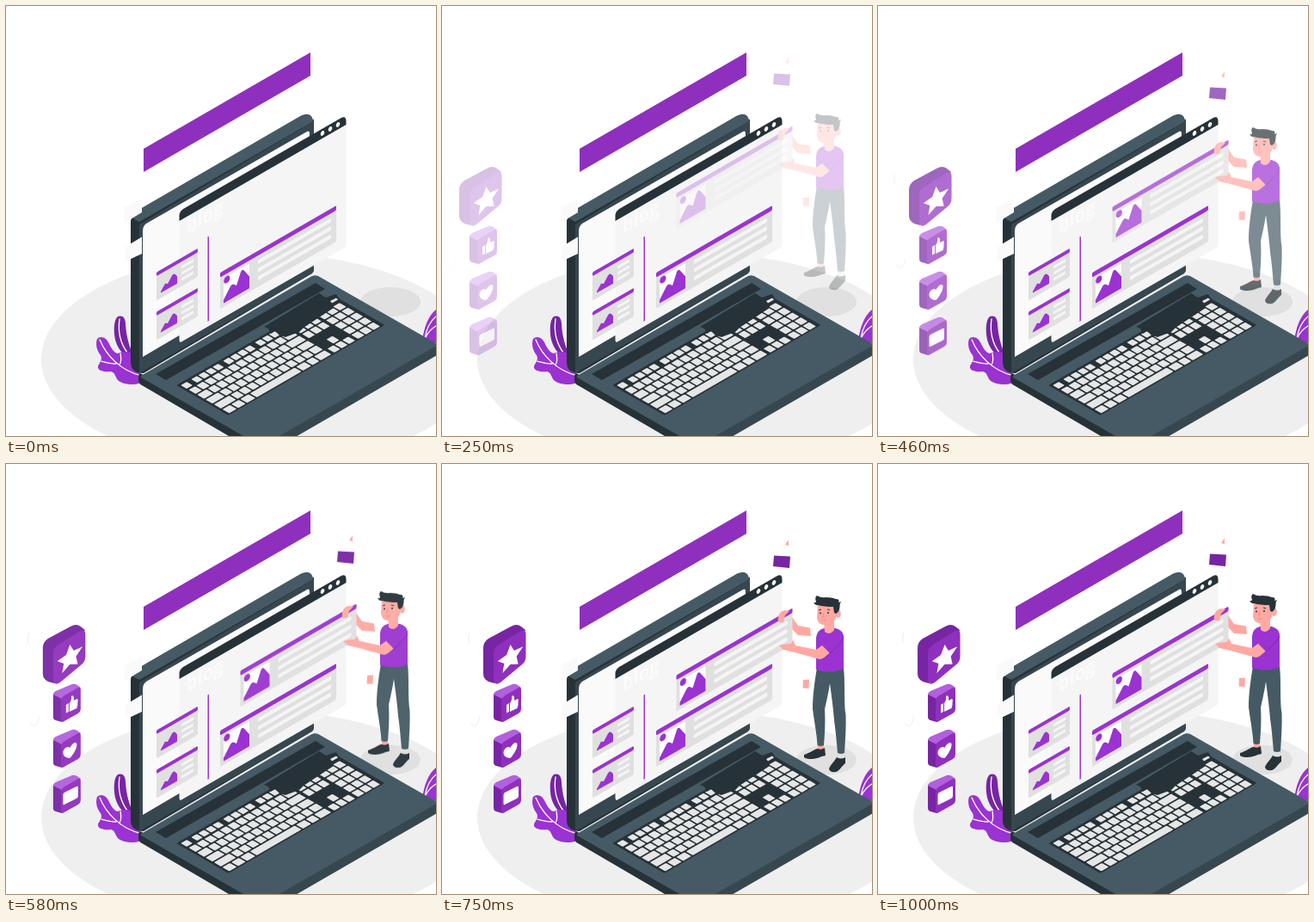
An HTML page that plays this animation: 500 by 500 pixels, repeating every 1.04 s.

```html
<!DOCTYPE html>
<html lang="en">
<head>
<meta charset="utf-8">
<title>Blog post</title>
<style>
  html, body { margin: 0; width: 100%; height: 100%; overflow: hidden; background: #fff; }
  svg { display: block; width: 100%; height: 100%; }
  .purple { fill: #9a33d1; }
  .deep { fill: #8f2fbe; }
  .plum { fill: #7725a2; }
  .ink { fill: #263238; }
  .steel { fill: #37474f; }
  .slate { fill: #455a64; }
  .grey { fill: #e0e0e0; }
  .pale { fill: #f5f5f5; }
  .white { fill: #fff; }
  .skin { fill: #ffa8a2; }
  .vein { fill: none; stroke: #fff; stroke-width: 1.3; stroke-linecap: round; }
  .faint { fill: none; stroke: #ececec; }
  text { font: 700 23px "Open Sans", sans-serif; fill: #fbfbfb; }
</style>
</head>
<body>
<svg viewBox="0 0 500 500">
  <defs>
    <g id="post">
      <rect class="grey" width="135" height="42" rx="1.5"/>
      <rect class="purple" width="135" height="5.5" rx="1.5"/>
      <rect class="white" x="4" y="9" width="30" height="29"/>
      <path class="purple" d="M4 38V34L12 23Q14 21 16 23L19 26 24 13Q26 10 28 14L34 24V38Z"/>
      <ellipse class="purple" cx="7.8" cy="12.500" rx="3.6" ry="4"/>
      <g class="pale">
        <rect x="44" y="11" width="85" height="4.6" rx="1"/>
        <rect x="44" y="20.500" width="85" height="4.6" rx="1"/>
        <rect x="44" y="30" width="85" height="4.6" rx="1"/>
      </g>
    </g>
    <g id="teaser">
      <rect class="grey" width="48" height="33" rx="1.5"/>
      <rect class="purple" width="48" height="4.6" rx="1.5"/>
      <path class="purple" d="M5 27V25.500L10 19 13 21 18 14.500Q20 12.500 22 15.500L24 18.500V27Z"/>
      <g class="pale">
        <rect x="29" y="9.500" width="14" height="3.4" rx="1"/>
        <rect x="29" y="16.500" width="14" height="3.4" rx="1"/>
        <rect x="29" y="23.500" width="14" height="3.4" rx="1"/>
      </g>
    </g>
    <g id="tile">
      <path class="plum" d="M60 269Q60 266 63 267L70 271V300L63 298Q60 297 60 294Z"/>
      <path d="M60 268Q60 266 63 264L82 256Q85 255 88 257L92 260 70 273Z" fill="#b260de"/>
      <path class="deep" d="M69 275Q69 272 72 270L89 260Q92 259 92 262V285Q92 288 89 290L72 299.500Q69 301 69 298Z"/>
    </g>
  </defs>

  <ellipse cx="296" cy="411" rx="255" ry="124" fill="#efefef"/>
  <ellipse class="grey" cx="447" cy="344" rx="35" ry="17"/>

  <g id="plants">
    <path class="plum" d="M148 406C143 395 140 385 139 370C139 362 135 359 130 361C125 365 125 378 127 388C130 398 135 406 142 405Z"/>
    <path class="vein" d="M132 364C130 378 133 392 141 403"/>
    <path class="purple" d="M158 438C150 441 138 441 131 436C126 431 128 427 122 425C114 426 106 424 107 419C108 415 113 412 110 406C105 400 104 392 106 387C110 383 116 385 119 391C122 397 125 403 130 404C137 401 147 401 148 408C148 414 146 418 152 423L158 428Z"/>
    <path class="vein" d="M109 388C116 405 132 424 158 430M133 404C134 409 134 414 132 417M111 413C118 415 124 416 128 416"/>
    <path class="purple" d="M484 389C486 374 491 360 500 353V392Z"/>
    <path class="vein" d="M487 386C489 375 494 366 500 361M488 385C491 379 495 375 500 372"/>
  </g>

  <g id="laptop">
    <path class="ink" d="M145 251Q145 246 150 242L340 132H358V306Q358 310 354 312L160 427Q145 427 145 414Z"/>
    <path class="steel" d="M155 254L358 134V306Q358 310 354 312L155 427Z"/>
    <path class="slate" d="M146 246Q148 241 155 236.500L343 127.500Q355 122 357.500 134L155 251Z"/>
    <path class="ink" d="M154 430Q154 427 158 428L300 510V524L158 441Q154 439 154 435Z"/>
    <path class="steel" d="M297 511L503 392V405L297 524Z"/>
    <path class="slate" d="M157 430L354 315Q358 312 363 314L496 390Q505 394 497 397L304 508Q297 512 290 508L157 432Z"/>
    <path class="ink" d="M174 428L360 322 371 329 186 435Z"/>
    <g transform="matrix(.866 -.5 .866 .5 198 441)">
      <rect class="ink" width="210" height="70" rx="2"/>
      <g id="keys" fill="#e6e6e6"></g>
    </g>
    <path class="ink" d="M300 373L364 334 372 339 384 335 387 340 378 347 381 351 346 374 341 379 325 385 318 383 313 378 308 381 305 375Z"/>
    <path d="M377 343L384 339.500 386 341.500 379 345.500Z" fill="#e6e6e6"/>
    <path d="M159 262Q159 256 163 253L350 146Q353 144 353 149V294L159 408Z" fill="#fafafa"/>
  </g>

  <path d="M138 234L158 224V240L138 252ZM139 280L158 268.500V288L139 297Z" fill="#fafafa"/>
  <path class="deep" d="M160 166L354 54V81L160 193Z"/>

  <g id="browser">
    <path class="pale" d="M201.500 248L395.500 136V276Q395.500 280 392 282L204 390.500Q201.500 392 201.500 388Z"/>
    <path class="ink" d="M201.500 250V244Q201.500 239 206 236L389 130.500Q395.500 127 395.500 134V138Z"/>
    <g class="white">
      <ellipse cx="368" cy="148" rx="2" ry="3" transform="rotate(25 368 148)"/>
      <ellipse cx="377" cy="143" rx="2" ry="3" transform="rotate(25 377 143)"/>
      <ellipse cx="386" cy="138" rx="2" ry="3" transform="rotate(25 386 138)"/>
    </g>
    <text transform="translate(210 265) skewY(-30) scale(.866 1)">blog</text>
    <path class="purple" d="M234.500 268.500L236 268V366L234.500 367Z"/>
    <use href="#teaser" transform="translate(175 309.500) skewY(-30)"/>
    <use href="#teaser" transform="translate(175 355.500) skewY(-30)"/>
    <use href="#post" transform="translate(249 310) skewY(-30)"/>
  </g>

  <g id="drop">
    <path class="skin" d="M407 178L414 188 428 190.500 429 200 414 199 407 192Z"/>
    <use href="#post" transform="translate(272.500 245.500) skewY(-30)"/>
    <path class="skin" d="M391 184C390 176 393 171 399 170L404 171 399 176 397 184Z"/>
    <path class="skin" d="M399 94L403 88V95ZM420 251L427 250.500 426.500 261 419.500 260.500Z"/>
    <path class="plum" d="M386 106.500L405 107.500 404 121 385 119Z"/>

    <path class="skin" d="M437 325H444V333H437Z"/>
    <path class="grey" d="M460 335H468V343H460Z"/>
    <path class="ink" d="M421 338C428 336 434 331 437 331Q441 333 445 330L446 339C440 340 436 343 430 343Q423 343 421 341ZM450 354C452 349 457 345 459 341Q464 344 469 341V348C465 351 462 357 458 358C453 359 450 357 450 354Z"/>
    <path class="slate" d="M436 237C433 255 431 270 431 285C433 300 436 315 436.500 327Q440 329 444 327C445 315 446 300 445 285C448 272 450 262 451 255C453 270 455 285 456 298C458 312 459 325 460 336Q464 338 468 336C469 320 470 305 469.500 292C467 278 469 255 467 237Z"/>
    <path class="purple" d="M435 202Q436 193 444 191L458 191Q466 193 467 201V238Q452 245 435 239Z"/>
    <path class="skin" d="M444 182H456V193Q451 200 445 195Z"/>
    <path class="skin" d="M437 162H458V180Q453 188 443 187Q437 186 436 179Z"/>
    <ellipse class="skin" cx="460.500" cy="174" rx="3.300" ry="5"/>
    <path class="ink" d="M432 161Q434 162 435 160Q433 155 436 153Q441 156 446 155Q454 155 458 157Q463 157 461 161L464 160Q462 163 462.500 166Q462 172 458 174L456 173 455 166Q444 166 437 164Q434 165 432 161Z"/>
    <g class="ink">
      <circle cx="440" cy="173.500" r="1"/>
      <circle cx="449" cy="173" r="1"/>
      <path d="M438 169.500L441 168.500V169.500L438 170.500ZM448 168.500L451 169.500V170.500L448 169.500Z"/>
    </g>
    <path d="M444 173L442.500 178H444M442 182Q445 183 447 181.500" fill="none" stroke="#f0807c" stroke-width=".8"/>
    <path class="skin" d="M392 211Q399 209 406 209L408 204.500 411 211 435 216 446 208 453 217Q444 227 439 227L410 219 397 216Z"/>
    <path class="purple" d="M453 196Q465 191 467 200Q467 206 451 220L442 211Z"/>
    <path d="M467 202Q464 209 451 220" fill="none" stroke="#7725a2" stroke-width=".7"/>
  </g>

  <g id="icons">
    <path class="faint" d="M32 196Q30 202 31 208M33 302L39 305Q43 300 44 294"/>
    <path class="plum" d="M48 214Q48 207 54 203L80 189Q87 185 92 189L97 193 61 255 54 253Q48 250 48 244Z"/>
    <path class="deep" d="M60 220Q60 214 66 210L90 195Q97.500 191 97.500 198V224Q97.500 230 92 234L68 254Q60 259 60 249Z"/>
    <path id="star" class="white" transform="translate(79.500 225.500) skewY(-30)"/>
    <use href="#tile"/>
    <use href="#tile" y="53"/>
    <use href="#tile" y="106"/>
    <g class="white">
      <path d="M75 280L78 278V288L75 289.500ZM79 278Q82 274 81 270Q83 268 84 271V275L88 273Q89.500 274 88.500 277Q89 280 87.500 284L79 288Z"/>
      <path transform="translate(79.500 333) skewY(-30)" d="M0 9C-5 6 -8 2 -8 -2C-8 -7 -2 -7 0 -3C2 -7 8 -7 8 -2C8 2 5 6 0 9Z"/>
      <path d="M71.500 385Q71.500 383 73 382L87 375Q89 374 89 376V386Q89 388 87 389L73 396Q71.500 397 71.500 395Z"/>
    </g>
  </g>
</svg>
<script>
  const byId = id => document.getElementById(id);
  const LOOP = 1040, FPS = 24;
  const drop = byId("drop"), icons = byId("icons");

  function drawStar() {
    const points = Array.from({ length: 10 }, (_, i) => {
      const r = i % 2 ? 7.5 : 15.5, a = i * Math.PI / 5 - Math.PI / 2;
      return `${r * Math.cos(a)} ${r * Math.sin(a)}`;
    });
    byId("star").setAttribute("d", `M${points.join("L")}Z`);
  }

  function drawKeys() {
    const keys = [];
    const key = (x, y, w = 8.6, h = 9.3) =>
      keys.push(`<rect x="${x}" y="${y}" width="${w}" height="${h}" rx="1"/>`);
    const rowY = row => 13.7 + row * 11.3;

    key(3, 3, 8, 8);
    for (let group = 0; group < 3; group++)
      for (let i = 0; i < 4; i++) key(17 + group * 42.7 + i * 9.5, 3, 7.6, 8);

    for (let row = 0; row < 4; row++) {
      const first = 8.4 + row * 4;
      key(3, rowY(row), first);
      let x = 5 + first;
      for (; x < 120; x += 10.4) key(x, rowY(row));
      key(x, rowY(row), 140 - x);
    }
    [[3, 10], [15, 10], [27, 11], [40, 60], [102, 11], [115, 9], [126, 14]]
      .forEach(([x, w]) => key(x, rowY(4), w));

    for (let i = 0; i < 3; i++) {
      const x = 144 + i * 10;
      for (const row of [0, 1, 4]) key(x, rowY(row), 8);
    }
    key(154, rowY(3), 8);
    for (let row = 0; row < 5; row++)
      for (let i = 0; i < 3; i++) key(176 + i * 10.4, rowY(row));
    byId("keys").innerHTML = keys.join("");
  }

  // Slide with a slight overshoot, in pixels from rest.
  function slide(seconds) {
    const a = seconds - 0.25;
    return -28 + 89.2 * a - 53.7 * a ** 2 - 25.3 * a ** 3;
  }

  function render(ms) {
    const step = Math.floor((ms % LOOP + 4) * FPS / 1000);
    const seconds = Math.min(step, 24) / FPS;
    const opacity = step < 4 ? 0 : Math.min(1, (seconds - 0.11) * 2);
    const offset = slide(seconds);
    drop.setAttribute("opacity", opacity);
    icons.setAttribute("opacity", opacity);
    drop.setAttribute("transform", `translate(0 ${offset})`);
    icons.setAttribute("transform", `translate(${offset} 0)`);
  }

  drawStar();
  drawKeys();
  let start;
  function tick(now) {
    start ??= now;
    render(now - start);
    requestAnimationFrame(tick);
  }
  render(0);
  requestAnimationFrame(tick);
</script>
</body>
</html>
```
